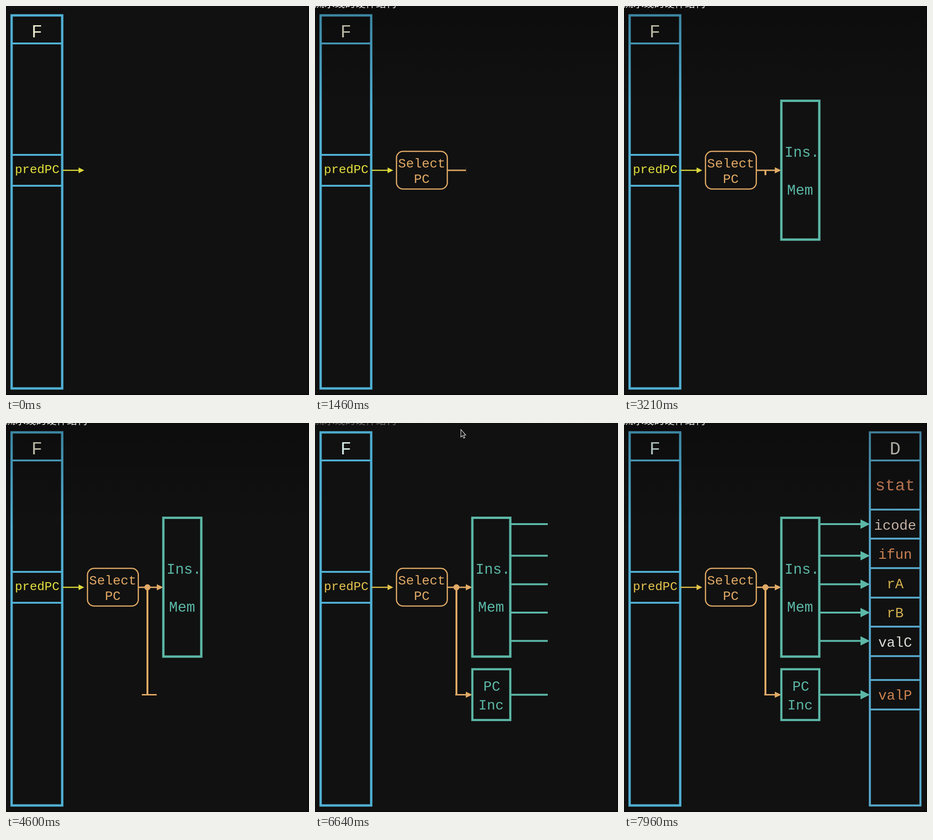
Animation of 647 by 831 pixels, one loop 8 s. Source, as an HTML page:

```html
<!DOCTYPE html>
<html lang="en">
<head>
<meta charset="utf-8">
<title>Fetch stage</title>
<style>
  html, body { margin: 0; width: 100%; height: 100%; overflow: hidden; background: #111; }
  svg { display: block; width: 647px; height: 831px; }
  text { font-family: "Liberation Mono", "DejaVu Sans Mono", monospace; text-anchor: middle; }
  #title { font: 500 22px "Noto Sans CJK SC", "Noto Sans CJK", "Noto Sans CJK JP", sans-serif; text-anchor: start; }
</style>
</head>
<body>
<svg id="stage" viewBox="0 0 647 831">
  <defs>
    <linearGradient id="dim" x1="0" y1="0" x2="0" y2="1">
      <stop offset="0" stop-opacity=".26"/>
      <stop offset="1" stop-opacity="0"/>
    </linearGradient>
  </defs>
  <rect width="647" height="831" fill="#111"/>
  <path d="M0 829.5H647M646.5 0V831" stroke="#090909" stroke-width="2"/>
</svg>
<script>
const LOOP = 8000;
const BLUE = '#50b0d4', ORANGE = '#e1aa66', TEAL = '#5cb8a7';
const stage = document.getElementById('stage');

function add(parent, tag, attrs, content) {
  const el = document.createElementNS('http://www.w3.org/2000/svg', tag);
  for (const name in attrs) el.setAttribute(name, attrs[name]);
  if (content) el.textContent = content;
  parent.appendChild(el);
  return el;
}

const group = () => add(stage, 'g', {});

function label(parent, content, x, y, size, fill) {
  return add(parent, 'text', { x, y, 'font-size': size, fill }, content);
}

function box(parent, x1, y1, x2, y2, color, weight, rx = 0) {
  add(parent, 'rect', {
    x: x1, y: y1, width: x2 - x1, height: y2 - y1, rx,
    fill: 'none', stroke: color, 'stroke-width': weight
  });
}

function line(parent, x1, y1, x2, y2, color, weight) {
  return add(parent, 'line', { x1, y1, x2, y2, stroke: color, 'stroke-width': weight });
}

function arrow(parent, x1, x2, y, color, weight, length, half) {
  const shaft = line(parent, x1, y, x2 - length + 1, y, color, weight);
  const head = add(parent, 'path', {
    d: `M${x2 - length} ${y - half}L${x2} ${y}L${x2 - length} ${y + half}Z`, fill: color
  });
  return { shaft, head };
}

function column(parent, x, color, weight, rows) {
  box(parent, x, 20, x + 108, 817, color, weight);
  for (const y of rows) line(parent, x, y, x + 108, y, color, 4);
}

// Rectangle that uncovers a group from its left or top edge
function wipe(parent, id, x, y, width, height) {
  const clip = add(stage, 'clipPath', { id });
  parent.setAttribute('clip-path', `url(#${id})`);
  return add(clip, 'rect', { x, y, width, height });
}

// Fetch register
const fetchReg = group();
column(fetchReg, 12, BLUE, 5, [80, 318, 384]);
const fetchName = label(fetchReg, 'F', 66, 67, 39, '#e8e6cc');
const predName = label(fetchReg, 'predPC', 66.5, 357, 26.4, '#e4e03e');
const predArrow = arrow(fetchReg, 121, 167, 351, '#dcd93c', 2.6, 12, 6);

// PC selection
const select = group();
box(select, 174, 310.5, 282.5, 391, ORANGE, 2.6, 14);
label(select, 'Select', 228, 345, 28, ORANGE);
label(select, 'PC', 228, 378, 28, ORANGE);

const feed = group();
arrow(feed, 283, 336, 351, ORANGE, 3, 14, 6.5);
const feedWipe = wipe(feed, 'feedClip', 283, 340, 0, 22);

// Instruction memory
const memory = group();
box(memory, 336, 202.5, 417, 499, TEAL, 5);
label(memory, 'Ins.', 380, 322, 31, TEAL);
label(memory, 'Mem', 376, 403, 31, TEAL);

// Branch down to the incrementer
const drop = group();
line(drop, 302, 351, 302, 580, ORANGE, 4);
const dropWipe = wipe(drop, 'dropClip', 296, 351, 12, 0);
const dot = add(stage, 'circle', { cx: 302, cy: 351, r: 6.5, fill: ORANGE });

const branch = group();
const branchArrow = arrow(branch, 290, 336, 580.5, ORANGE, 3, 14, 6.5);
const branchWipe = wipe(branch, 'branchClip', 290, 570, 0, 22);

const inc = group();
box(inc, 336, 526, 417, 634.5, TEAL, 4.6);
label(inc, 'PC', 377.5, 572, 30, TEAL);
label(inc, 'Inc', 376, 612, 30, TEAL);

// Outputs to the decode register
const outputs = group();
for (const y of [216, 283.5, 344.5, 405, 465.5, 580.5]) arrow(outputs, 418, 525, y, TEAL, 4, 20, 10);
const outWipe = wipe(outputs, 'outClip', 418, 200, 0, 400);

const decode = group();
column(decode, 525, '#55a6c8', 4.4, [80, 185, 247, 310, 373, 435, 498, 549, 612]);
[
  ['D', 67, 39, '#d4d2c8'],
  ['stat', 144, 35.5, '#cc7f58'],
  ['icode', 228, 30, '#c4b2a6'],
  ['ifun', 290, 30, '#cc8352'],
  ['rA', 353, 30, '#d3b04e'],
  ['rB', 415, 30, '#d3b04e'],
  ['valC', 478, 30, '#dcdcd8'],
  ['valP', 591, 30, '#cc8350']
].forEach(([name, y, size, fill]) => label(decode, name, 579, y, size, fill));

// Player overlay and pointer
const shade = add(stage, 'rect', { width: 647, height: 220, fill: 'url(#dim)' });
const title = add(stage, 'text', { id: 'title', x: -2, y: 2, fill: '#eee' }, '流水线的硬件结构');
const pointer = add(stage, 'path', {
  d: 'M311.5 14V30L315 26.8L317.6 32.6L320 31.5L317.5 25.8H322Z',
  fill: '#111', stroke: '#e8e8e8', 'stroke-width': 1.1
});

const ramp = (t, start, length) => Math.min(1, Math.max(0, (t - start) / length));

function keyed(t, keys) {
  let [t0, v0] = keys[0];
  for (const [t1, v1] of keys) {
    if (t < t1) return v0 + (v1 - v0) * (t - t0) / (t1 - t0);
    [t0, v0] = [t1, v1];
  }
  return v0;
}

const FADES = [[select, 130, 500], [memory, 1820, 500], [dot, 3690, 280], [inc, 5450, 480], [decode, 7450, 510]];
const WIPES = [
  [feedWipe, 'width', 53, 1090, 500],
  [dropWipe, 'height', 231, 3188, 500],
  [branchWipe, 'width', 46, 4255, 500],
  [outWipe, 'width', 107, 6275, 494]
];
const SHADE = [[0, 0], [1050, 0], [1250, 1], [6400, 1], [6600, .12], [6720, .12], [6920, 1]];
const TITLE = [[0, 0], [1050, 0], [1250, 1], [6400, 1], [6600, .4], [6720, .4], [6920, 1]];

function render(t) {
  for (const [el, start, length] of FADES) el.setAttribute('opacity', ramp(t, start, length));
  for (const [el, side, size, start, length] of WIPES) el.setAttribute(side, size * ramp(t, start, length));
  shade.setAttribute('opacity', keyed(t, SHADE));
  title.setAttribute('opacity', keyed(t, TITLE));
  pointer.setAttribute('visibility', t >= 6560 && t < 6850 ? 'visible' : 'hidden');

  const late = t >= 5030;
  const yellow = late ? '#e3c24a' : '#dcd93c';
  fetchName.setAttribute('fill', late ? '#d8eeea' : '#e8e6cc');
  predName.setAttribute('fill', late ? '#e6c44e' : '#e4e03e');
  predArrow.shaft.setAttribute('stroke', yellow);
  predArrow.head.setAttribute('fill', yellow);
  branchArrow.shaft.setAttribute('x1', t < 5240 ? 290 : 299.5);
}

let begin;
function tick(now) {
  begin ??= now;
  render((now - begin) % LOOP);
  requestAnimationFrame(tick);
}
render(0);
requestAnimationFrame(tick);
</script>
</body>
</html>
```
